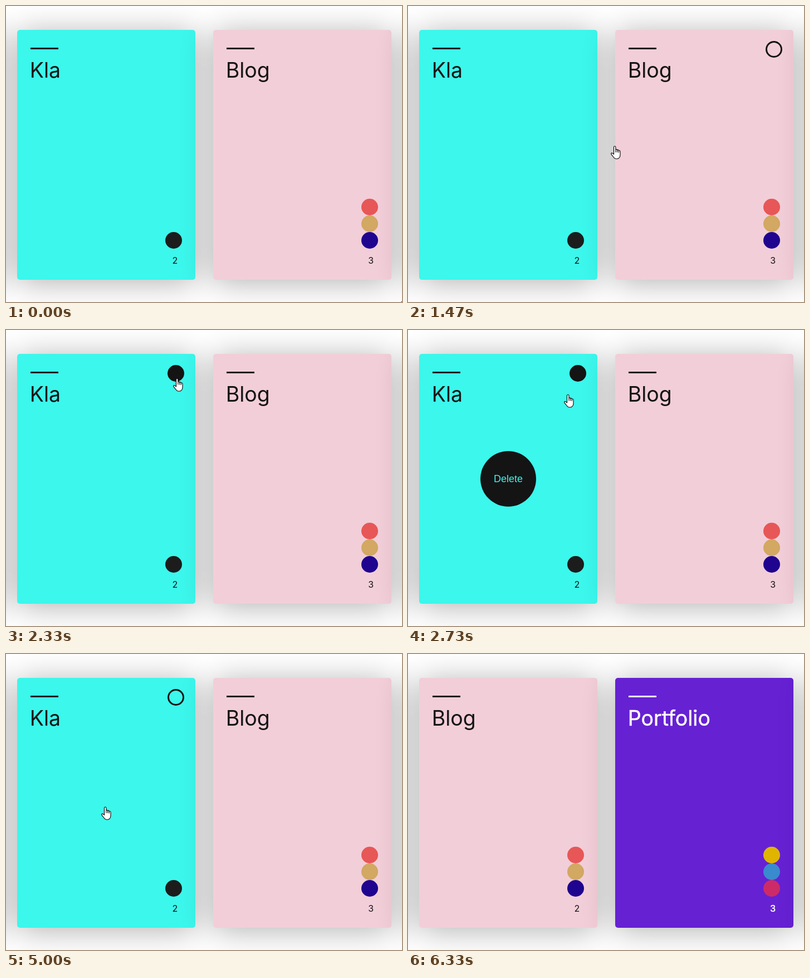
Animation, 711 px wide and 533 px high, one loop 8.87 s. Source, as an HTML page:

```html
<!DOCTYPE html>
<html lang="en">
<head>
<meta charset="utf-8">
<title>Cards</title>
<style>
  html, body { margin: 0; width: 100%; height: 100%; overflow: hidden; background: #fff; }
  #stage { position: fixed; inset: 0; overflow: hidden; contain: strict; }
  .card {
    position: absolute; top: 43px; width: 320px; height: 450px; border-radius: 5px;
    box-shadow: 0 5px 56px rgba(0, 0, 0, .31);
  }
  svg { position: absolute; left: 0; top: 0; }
  .title { font: 37.5px Inter, sans-serif; }
  .number { font: 16px Inter, sans-serif; text-anchor: middle; }
  .delete { font: 18px "Liberation Sans", Arial, sans-serif; text-anchor: middle; }
</style>
</head>
<body>
<div id="stage">
  <div id="deck"></div>
  <svg width="711" height="533">
    <circle id="ring" cy="78" r="13.5" fill="#141414" stroke="#141414" stroke-width="3"/>
    <g id="menu">
      <circle cx="180" cy="268" r="50" fill="#141414"/>
      <text class="delete" x="180" y="274" fill="#3cf7ec">Delete</text>
    </g>
    <path id="hand" fill="#fff" stroke="#000" stroke-width="1.1" stroke-linejoin="round"
      d="M5.5 15V2.2a1.7 1.7 0 0 1 3.4 0V6.5q1.6-.9 2.7.6q1.7-.6 2.6.9q2.8-.4 2.8 2.2V16q0 3-1.5 5q-1.5 2.3-5 2.3t-5.2-2.8L.9 14.8q-.6-1.8 1-2.2q1-.2 3.6 2.4zM8.9 6.5v5M11.6 7.1v4.5M14.2 8v4"/>
  </svg>
</div>
<script>
const LOOP = 8870, FPS = 15;
const $ = id => document.getElementById(id);
const [deck, ring, menu, hand] = ['deck', 'ring', 'menu', 'hand'].map($);

// "heavy" thickens light text on a dark card
const kla = { title: 'Kla', fill: '#3cf7ec', ink: '#141414', heavy: 0, dots: ['#1c1c1c'] };
const blog = { title: 'Blog', fill: '#f2ced8', ink: '#141414', heavy: 0, dots: ['#1e048f', '#d2a862', '#e75757'] };
const portfolio = { title: 'Portfolio', fill: '#6621d3', ink: '#fff', heavy: .5, dots: ['#cc2b68', '#3a8ad0', '#e0b500'] };
const blank = { title: '', fill: '#fff', ink: 'none', heavy: 0, dots: [] };

function cardHTML({ title, fill, ink, heavy, dots }, i) {
  const circles = dots.map((c, k) => `<circle cx="281" cy="${379 - 30 * k}" r="15" fill="${c}"/>`).join('');
  return `<div class="card" style="left:${352 * i - 332}px;background:${fill}">
    <svg width="320" height="450" fill="${ink}">
      <rect x="24" y="32" width="50" height="3"/>
      ${circles}
      <g stroke="${ink}" stroke-width="${heavy}">
        <text class="title" x="22.7" y="86">${title}</text>
        <text class="number" x="283.3" y="421">${i + 1}</text>
      </g>
    </svg></div>`;
}

let shown;
function showDeck(cards) {
  if (shown === cards) return;
  shown = cards;
  deck.innerHTML = cards.map(cardHTML).join('');
}
const before = [blank, kla, blog, blank];
const after = [blank, blog, portfolio, blank];

// Pointer path: step, x, y, easing into the point
const linear = p => p, easeOut = p => p * (2 - p), smooth = p => p * p * (3 - 2 * p);
const path = [
  [13, 704, 532], [22, 364, 252, linear], [27, 306, 127, linear], [33, 300, 87, easeOut],
  [39, 300, 87, linear], [47, 171, 275, smooth], [92, 171, 275, linear], [94, 131, 295, linear],
];

function pointerAt(step) {
  const n = path.findIndex(key => key[0] >= step);
  if (n < 1) return path[0].slice(1);
  const [t0, x0, y0] = path[n - 1], [t1, x1, y1, ease] = path[n];
  const p = ease((step - t0) / (t1 - t0));
  return [x0 + (x1 - x0) * p, y0 + (y1 - y0) * p];
}

const toggle = (el, on) => el.style.display = on ? '' : 'none';

function draw(now) {
  const step = Math.floor((now % LOOP + 4) * FPS / 1000);
  const between = (a, b) => step >= a && step < b;

  showDeck(step < 76 ? before : after);

  const onBlog = between(16, 23);
  toggle(ring, onBlog || between(26, 76));
  ring.setAttribute('cx', onBlog ? 657 : 305);
  ring.setAttribute('fill-opacity', between(30, 75) ? Math.min(1, (step - 30) / 5) : 0);

  toggle(menu, between(38, 75));

  toggle(hand, step < 95);
  if (step < 95) {
    const [x, y] = pointerAt(step).map(Math.round);
    hand.setAttribute('transform', `translate(${x} ${y})`);
  }
}

const start = performance.now();
(function tick() {
  draw(performance.now() - start);
  requestAnimationFrame(tick);
})();
</script>
</body>
</html>
```
